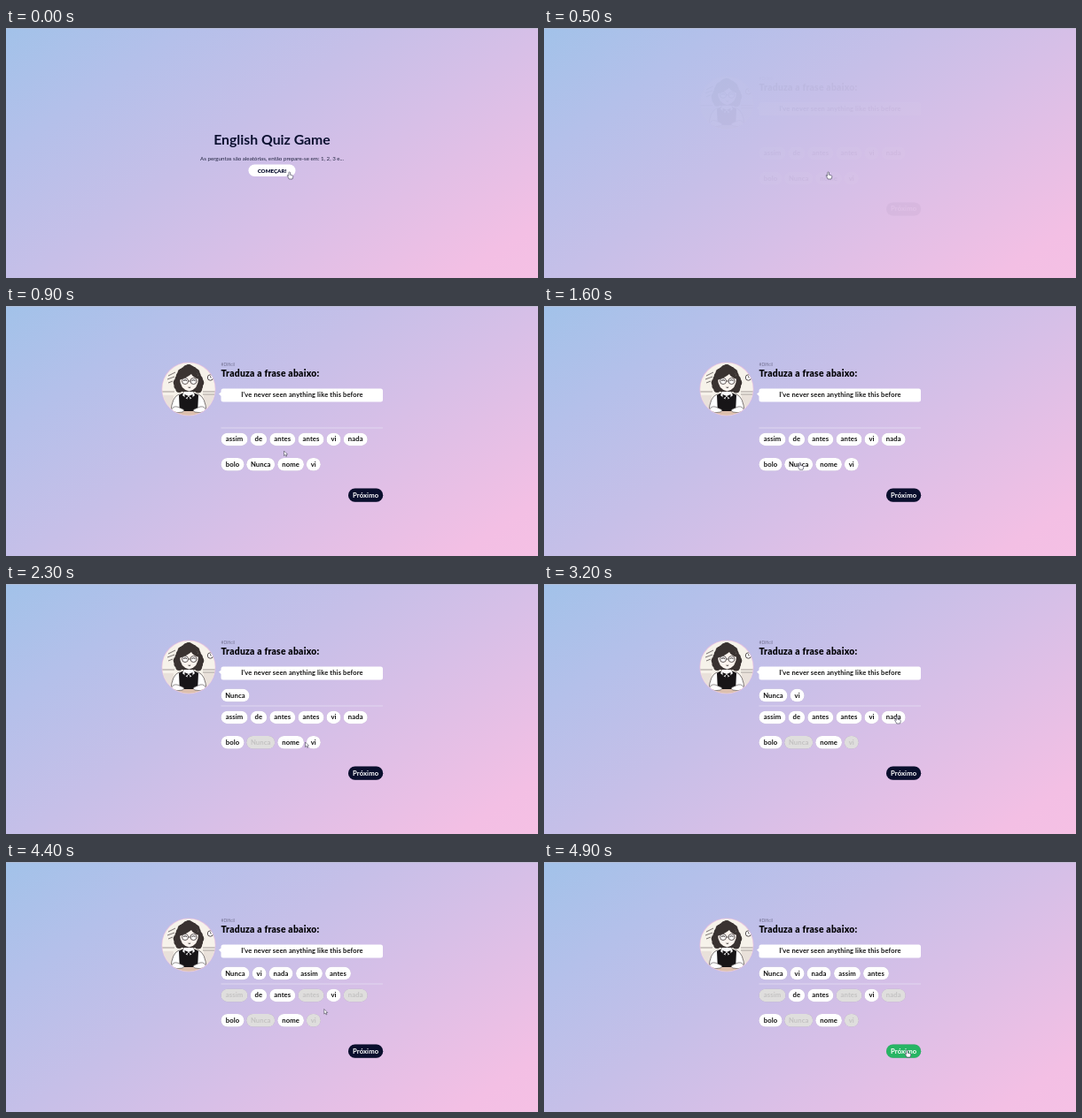
An HTML page for the animation above (5 s loop, 600 by 283 pixels).

```html
<!DOCTYPE html>
<html lang="pt">
<head>
<meta charset="utf-8">
<title>English Quiz Game</title>
<style>
html, body { margin: 0; width: 100%; height: 100%; overflow: hidden; }
body { background: linear-gradient(145deg, #a2c2e9 0%, #b4c0ea 20%, #c6bfe8 42%, #d8bfe7 62%, #f3bfe4 91%, #f5c0e4 100%); }
svg { display: block; width: 100vw; height: 100vh; }
text { font-family: Lato, "Open Sans", sans-serif; font-weight: 700; }
.mid { text-anchor: middle; }
.pill { filter: drop-shadow(0 .6px .5px rgba(40, 30, 70, .28)); }
</style>
</head>
<body>
<svg viewBox="0 0 600 283">
  <rect width="600" height="1" fill="#b9bccb" opacity=".55"/>

  <g id="start">
    <text class="mid" x="300" y="131.6" font-size="15.8" fill="#0b1030">English Quiz Game</text>
    <text class="mid" x="300" y="150" font-size="6.2" style="font-weight:400" fill="#20233f">As perguntas são aleatórias, então prepare-se em: 1, 2, 3 e...</text>
    <rect x="273.5" y="154.5" width="53" height="13.5" rx="6.75" fill="#fff"/>
    <text class="mid" x="300" y="163.5" font-size="6.2" style="font-weight:900" fill="#0b1030">COMEÇAR!</text>
  </g>

  <g id="quiz">
    <clipPath id="round"><circle cx="206" cy="94" r="29.8"/></clipPath>
    <circle cx="206" cy="94" r="30.6" fill="#e3bfe0"/>
    <g clip-path="url(#round)">
      <rect x="175" y="63" width="62" height="62" fill="#f6f2ea"/>
      <path d="M175 97h15M222 97h15M222 100h15" stroke="#8b827e" stroke-width=".8"/>
      <path d="M183 79l8-4M182 83l8-3M183 87l5-2" stroke="#6d6664" stroke-width=".9"/>
      <path d="M176 101h13v17h-13zM223 101h14v17h-14z" fill="#e9e1da"/>
      <circle cx="230.500" cy="81" r="3.200" fill="#fff" stroke="#443d3d" stroke-width=".9"/>
      <path d="M230.500 79v2h1.500" fill="none" stroke="#443d3d" stroke-width=".6"/>
      <g id="curls" fill="#3a3331"></g>
      <path d="M186 120q1-17 9-20h22q8 3 9 20z" fill="#fff" stroke="#494343" stroke-width=".7"/>
      <path d="M195 101q4-3 8-3l3 5 3-5q4 0 8 3l-1 21h-20z" fill="#171517"/>
      <path d="M201 97h10l2 4-7 6-7-6z" fill="#fff"/>
      <path d="M206 102l-4.500-2v5zm0 0l4.500-2v5zM205 103h2l2 7-3-2-3 2z" fill="#171517"/>
      <path d="M196 82q0-9 10.500-9t10.500 9q0 12-10.500 14.500-10.500-2.500-10.500-14.500z" fill="#fbf4ee"/>
      <path d="M195 84q-1-12 8-14 12-1 15 13-7-2-9-6-6 5-14 7z" fill="#3a3331"/>
      <g fill="#fff" fill-opacity=".75" stroke="#3b3333" stroke-width=".8">
        <circle cx="202" cy="85" r="3.500"/><circle cx="211.500" cy="85" r="3.500"/>
        <path d="M205.500 85h2.500"/>
      </g>
      <path d="M200 84.600q2-1.800 4 0M209.500 84.600q2-1.800 4 0M205.500 92q1.300.800 2.600 0" fill="none" stroke="#221d1d" stroke-width=".9"/>
      <path d="M175 119h62v7h-62z" fill="#dcbfae"/>
      <path d="M187 119q0-6 6-5l7 3q2 2-1 3-6 2-12-1zM225 119q0-6-6-5l-7 3q-2 2 1 3 6 2 12-1z" fill="#fff" stroke="#494343" stroke-width=".6"/>
    </g>
    <text x="242.5" y="68.3" font-size="5" style="font-weight:400" fill="#777596">#Difícil</text>
    <text x="242.5" y="80" font-size="10.3" letter-spacing=".24" style="font-weight:900" fill="#050509">Traduza a frase abaixo:</text>
    <path d="M245 93.5H422.5a2.5 2.5 0 0 1 2.5 2.5V106a2.5 2.5 0 0 1-2.5 2.5H245a2.5 2.5 0 0 1-2.5-2.5V102l-2.500-2.500 2.500-2V96a2.500 2.500 0 0 1 2.500-2.500z" fill="#fff"/>
    <text class="mid" x="334" y="103.4" font-size="7.5" letter-spacing=".15" fill="#111">I've never seen anything like this before</text>
    <path d="M242.5 138H425" stroke="#e4dcf2" stroke-width=".8"/>
    <g id="words"></g>
    <g id="next"></g>
  </g>

  <g id="cursor">
    <path id="hand" d="M-1.200-3.500q1-1 1.700 0V-.800l2.600.700q.900.400.700 1.500L3 4H-.800L-3-.100q.300-1 1.800.500z" fill="#fff" stroke="#45435a" stroke-width=".65" stroke-linejoin="round"/>
    <path id="arrow" d="M-1.500-3V2.500l1.300-1.100 1 2 .9-.4-.9-2h1.700z" fill="#fff" stroke="#4a485a" stroke-width=".6" stroke-linejoin="round"/>
  </g>
</svg>
<script>
const $ = id => document.getElementById(id);
const LOOP = 5000, STEP = 100, HOVER = 4700;

function add(parent, tag, attrs, text) {
  const el = document.createElementNS("http://www.w3.org/2000/svg", tag);
  for (const k in attrs) el.setAttribute(k, attrs[k]);
  if (text) el.textContent = text;
  return parent.appendChild(el);
}

function pill(parent, word, x, y, w, h = 14.5) {
  const g = add(parent, "g", { class: "pill" });
  const box = add(g, "rect", { x, y, width: w, height: h, rx: h / 2, fill: "#fff" });
  const label = add(g, "text", { class: "mid", x: x + w / 2, y: y + h / 2 + 2.5, "font-size": 7.7, "letter-spacing": .1, fill: "#111" }, word);
  return { g, paint(bg, ink) { box.setAttribute("fill", bg); label.setAttribute("fill", ink); } };
}

// Curly hair: lobes that spread wider towards the shoulders
for (let i = 0; i < 17; i++) {
  const a = (140 + i * 260 / 16) * Math.PI / 180;
  const spread = 12 + 3 * Math.sin(a);
  add($("curls"), "circle", { cx: 206 + spread * Math.cos(a), cy: 85 + 14 * Math.sin(a), r: 4 + i % 3 * .5 });
}
add($("curls"), "ellipse", { cx: 206, cy: 84, rx: 14, ry: 15 });

// word, x, y, width, time picked, x among the answers
const words = [
  ["assim", 242.5, 143.7, 30, 3700, 327],
  ["de", 275.7, 143.7, 18.5],
  ["antes", 297.3, 143.7, 29],
  ["antes", 329.5, 143.7, 29, 4300, 360],
  ["vi", 361.5, 143.7, 16],
  ["nada", 380.7, 143.7, 27, 3300, 296.5],
  ["bolo", 242.5, 172, 26],
  ["Nunca", 271.2, 172, 32, 1800, 242.5],
  ["nome", 306.3, 172, 29.7],
  ["vi", 338.8, 172, 16, 2600, 277.6]
].map(([word, x, y, w, at = Infinity, ax]) => ({
  at,
  option: pill($("words"), word, x, y, w),
  answer: at < LOOP ? pill($("words"), word, ax, 118.8, w) : null
}));
const next = pill($("next"), "Próximo", 386, 206.6, 39.2, 15.2);

// time, values
const fadeOut = [[0, 1], [100, .9], [200, .6], [300, .25], [400, 0]];
const fadeIn = [[400, 0], [500, .03], [600, .65], [700, .93], [800, 1]];
const path = [
  [0, 320, 167], [500, 321, 167], [700, 319, 167], [900, 315, 167], [1200, 312, 168],
  [1500, 289, 181], [2000, 289, 182], [2300, 339, 182], [2500, 347, 182], [2700, 347, 182],
  [3100, 398, 154], [3300, 399, 154], [3600, 260, 154], [3700, 260, 155], [3800, 290, 159],
  [4100, 344, 154], [4300, 344, 154], [4700, 409, 216], [4900, 410, 217]
];
const arrowSpans = [[600, 1400], [2100, 2400], [2800, 3000], [3400, 3500], [4400, 4600]];

function sample(table, t) {
  const i = table.findIndex(row => row[0] > t);
  if (i === 0) return table[0].slice(1);
  if (i < 0) return table[table.length - 1].slice(1);
  const a = table[i - 1], b = table[i], p = (t - a[0]) / (b[0] - a[0]);
  return a.slice(1).map((v, k) => v + (b[k + 1] - v) * p);
}

const show = (el, on) => el.setAttribute("visibility", on ? "visible" : "hidden");

function draw(t) {
  $("start").setAttribute("opacity", sample(fadeOut, t)[0]);
  const [shown] = sample(fadeIn, t);
  $("quiz").setAttribute("opacity", shown);
  $("quiz").setAttribute("transform", `translate(0 ${-9.5 * (1 - shown)})`);

  for (const { at, option, answer } of words) {
    const used = t >= at;
    option.paint(used ? "#dfdedd" : "#fff", used ? "#c3c2c2" : "#111");
    if (answer) show(answer.g, used);
  }
  next.paint(t >= HOVER ? "#27b564" : "#0a0f2d", "#fff");

  $("cursor").setAttribute("transform", `translate(${sample(path, t).join(" ")})`);
  const plain = arrowSpans.some(([a, b]) => t >= a && t <= b);
  show($("arrow"), plain);
  show($("hand"), !plain);
}

const begin = performance.now();
function tick() {
  const t = (performance.now() - begin) % LOOP;
  draw(Math.floor(t / STEP) * STEP);
  requestAnimationFrame(tick);
}
tick();
</script>
</body>
</html>
```
